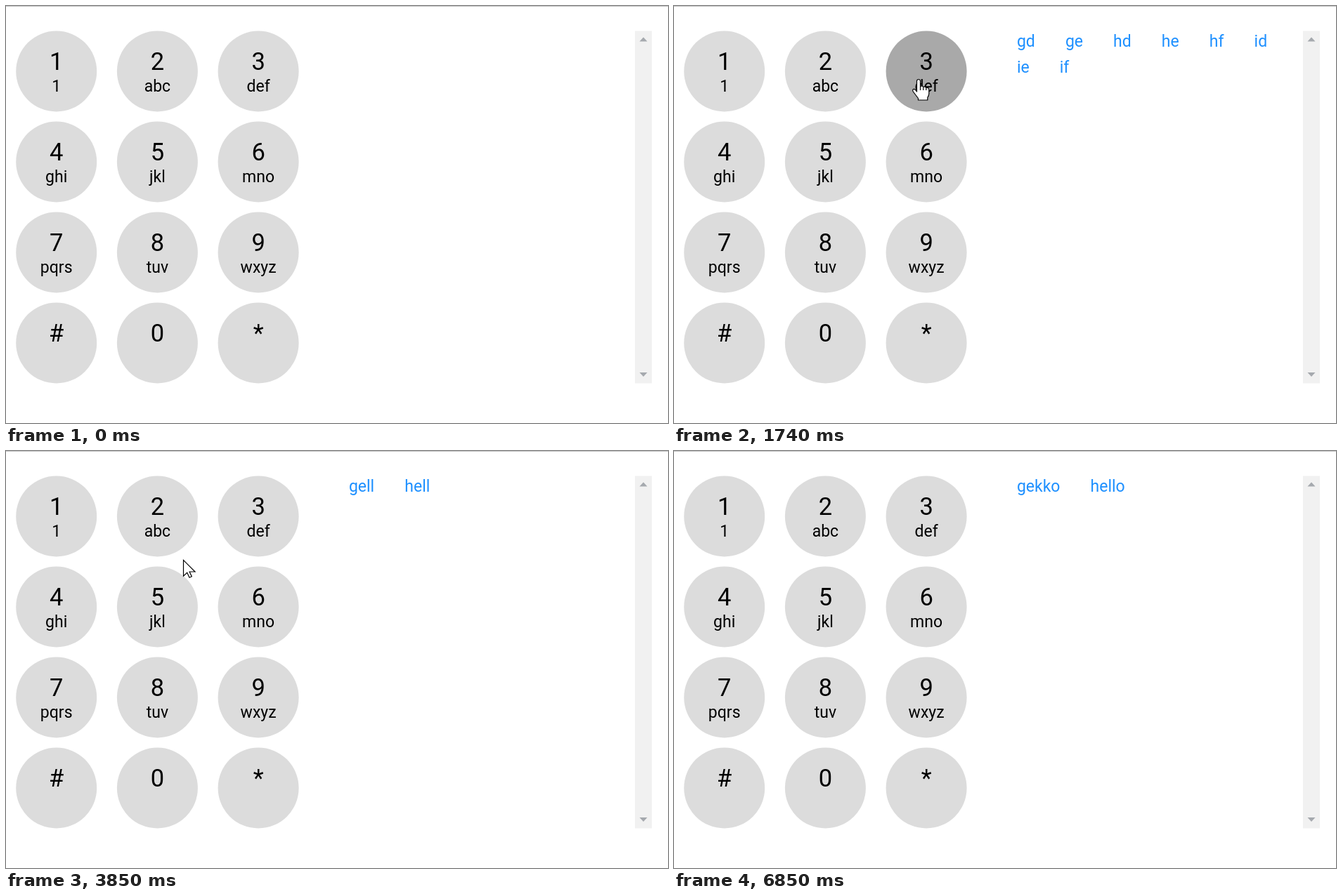
Write an HTML page that moves like this. It is 942 by 594 pixels and loops after 7710 ms.

```html
<!DOCTYPE html>
<html lang="en">
<head>
<meta charset="utf-8">
<title>Keypad words</title>
<style>
  html, body { margin: 0; width: 100%; height: 100%; overflow: hidden; background: #fff; }
  body { position: relative; font-family: Roboto, sans-serif; }
  svg { position: absolute; left: 0; top: 0; }
  #pad circle { fill: #dcdcdc; }
  #pad circle.hover { fill: #a9a9a9; }
  #pad text { text-anchor: middle; }
  .digit { font-size: 34.5px; }
  .letters { font-size: 23px; }
  #words {
    position: absolute; left: 487.9px; top: 32px; width: 400px;
    display: flex; flex-wrap: wrap; column-gap: 43.1px;
    font-size: 23px; line-height: 37px; color: #1e90ff;
  }
  #arrow, #hand { fill: #fff; stroke: #000; stroke-width: 1.2; }
</style>
</head>
<body>
<svg width="942" height="594">
  <rect width="942" height="1" fill="#c4c4c4"/>
  <g id="pad"></g>
  <rect x="895" y="35.5" width="24" height="502" fill="#f1f1f1"/>
  <path d="M901.5 50.5l5.5-6 5.5 6zM901.5 522l5.5 6 5.5-6z" fill="#a5a9ae"/>
</svg>
<div id="words"></div>
<svg width="942" height="594">
  <g id="cursor">
    <circle id="ring" r="17" fill="#ff0" fill-opacity=".47"/>
    <path id="arrow" d="M.5 .5V23.2L5.7 18.2 9 25.3 12.3 23.8 9.1 17H17z"/>
    <path id="hand" stroke-linejoin="round" d="M-2.5 18V3a2.5 2.5 0 0 1 5 0V10.5q2.2-1.5 4.3.8 2.2-1 4 1 3.8-.6 4 2.7V21q0 2-2 5.5V30H-.5V27.5L-7.7 18q-1.6-3 1-3.6 1.8-.2 4.2 3.6zM2.5 10.5V16M6.8 11.3V16M10.8 12.3V16"/>
  </g>
</svg>
<script>
const LOOP = 7710, STEP = 75, RADIUS = 57.5;
const LEAVE = 6850;
const KEYS = ['1 1', '2 abc', '3 def', '4 ghi', '5 jkl', '6 mno',
              '7 pqrs', '8 tuv', '9 wxyz', '#', '0', '*'];

// [arrival ms, x, y, steps taken to get there]
const MOVES = [
  [70, 799, 563, 1], [210, 75, 355, 2], [610, 79, 253, 3],
  [1160, 281, 139, 3], [1490, 348, 104, 4], [2210, 241, 217, 5],
  [3150, 131, 172, 3], [3390, 80, 205, 3], [3690, 225, 200, 4],
  [3850, 252, 155, 2], [3930, 325, 120, 1], [4180, 362, 228, 3],
  [4890, 555, 294, 1], [4980, 594, 327, 1], [5440, 715, 339, 3],
  [6470, 603, 452, 3], [6780, 871, 370, 2]
];
const CLICKS = [[760, 860], [1640, 1740], [2380, 2450], [2530, 2600], [4330, 4400]];
const WORDS = [
  [0, ''], [860, 'g h i'], [1740, 'gd ge hd he hf id ie if'],
  [2770, 'gel hel'], [2920, 'gell hell'], [4480, 'gekko hello']
];

const $ = id => document.getElementById(id);
const [pad, words, cursor, ring, arrow, hand] =
  ['pad', 'words', 'cursor', 'ring', 'arrow', 'hand'].map($);

function add(tag, attrs, text = '') {
  const el = document.createElementNS('http://www.w3.org/2000/svg', tag);
  for (const name in attrs) el.setAttribute(name, attrs[name]);
  el.textContent = text;
  return pad.appendChild(el);
}

const buttons = KEYS.map((key, i) => {
  const x = 71.7 + 143.7 * (i % 3), top = 129 * Math.floor(i / 3), y = top + 93;
  const [digit, letters] = key.split(' ');
  const el = add('circle', { cx: x, cy: y, r: RADIUS });
  add('text', { x, y: top + 91, class: 'digit' }, digit);
  if (letters) add('text', { x, y: top + 122, class: 'letters' }, letters);
  return { x, y, el };
});

function pointerAt(t) {
  let pos = null;
  for (const [end, x, y, n] of MOVES) {
    const done = Math.min(n, Math.floor((t - end) / STEP) + n);
    if (done <= 0 || t >= LEAVE) break;
    const [px, py] = pos || [x, y], f = done / n;
    pos = [px + (x - px) * f, py + (y - py) * f];
  }
  return t >= LEAVE ? null : pos;
}

const show = (el, on) => el.setAttribute('visibility', on ? 'visible' : 'hidden');
let shown = '';

function draw(t) {
  const pos = pointerAt(t);
  let over = false;
  for (const b of buttons) {
    const hit = !!pos && Math.hypot(pos[0] - b.x, pos[1] - b.y) < RADIUS;
    b.el.classList.toggle('hover', hit);
    over = over || hit;
  }
  if (pos) cursor.setAttribute('transform', `translate(${Math.round(pos[0])} ${Math.round(pos[1])})`);
  show(arrow, pos && !over);
  show(hand, over);
  show(ring, CLICKS.some(([from, to]) => t >= from && t < to));

  const list = WORDS.filter(([from]) => t >= from).pop()[1];
  if (list !== shown) {
    shown = list;
    words.replaceChildren(...list.split(' ').filter(Boolean).map(word => {
      const el = document.createElement('span');
      el.textContent = word;
      return el;
    }));
  }
}

const start = performance.now();
function tick() {
  draw((performance.now() - start) % LOOP);
  requestAnimationFrame(tick);
}
tick();
</script>
</body>
</html>
```
